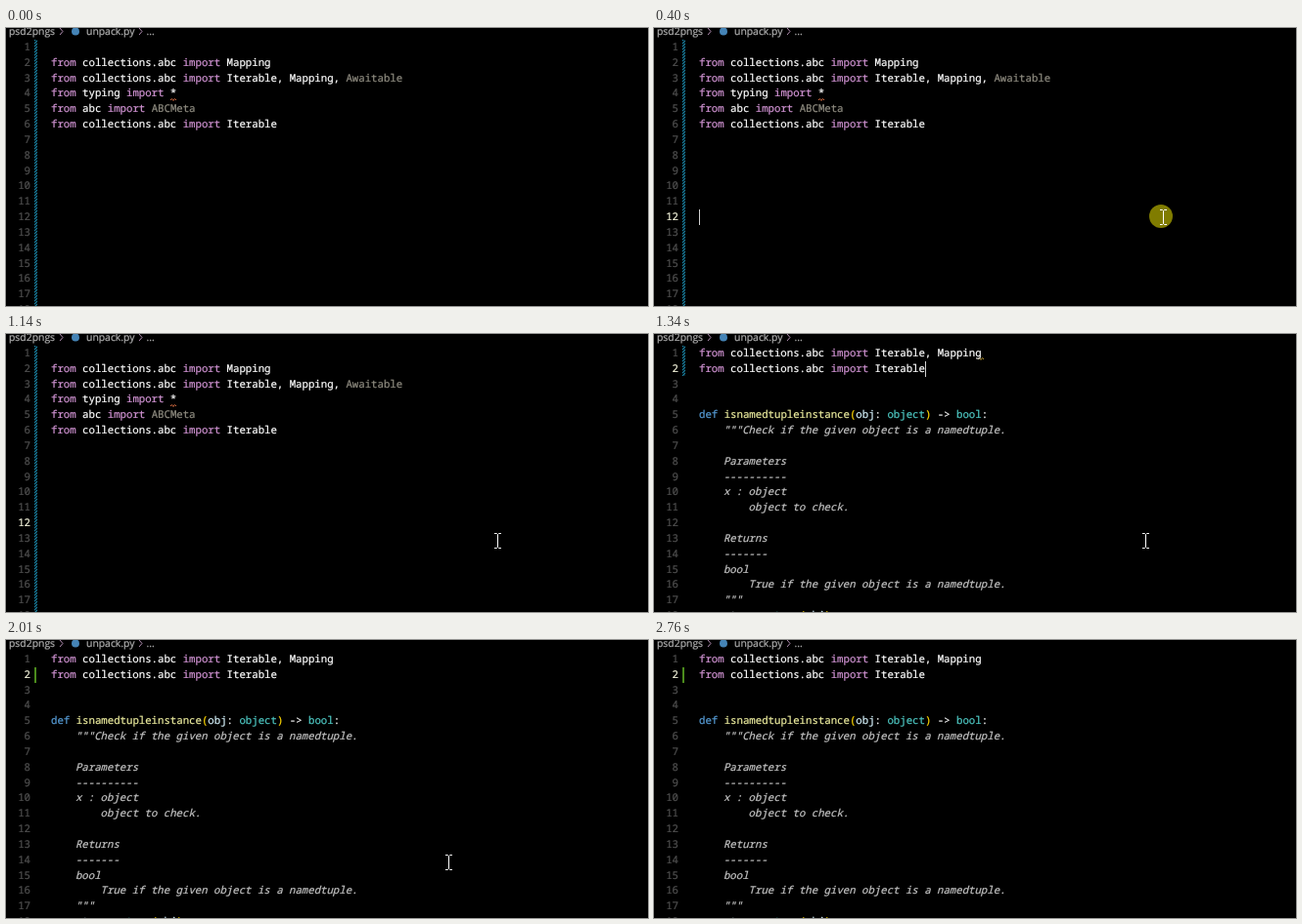
An HTML page that plays this animation: 656 by 285 pixels, repeating every 2.89 s.

```html
<!DOCTYPE html>
<html lang="en">
<head>
<meta charset="utf-8">
<title>Organizing imports</title>
<style>
  html, body { margin: 0; height: 100%; background: #000; overflow: hidden; }
  svg { display: block; width: 656px; height: 285px; }
  text {
    font: 10.69px "Noto Sans Mono", "DejaVu Sans Mono", monospace;
    color: #fff; white-space: pre; text-rendering: geometricPrecision;
  }
  text, tspan { fill: currentColor; stroke: currentColor; stroke-width: .22; }
  .crumb text { font: 10.4px "Open Sans", "Noto Sans", sans-serif; color: #b0b0b0; }
  .num { color: #505050; text-anchor: end; }
  .num.on { color: #f4f4dc; }
  .k { color: #d294d4; }
  .u { color: #8f8c80; }
  .d { color: #569cd6; }
  .f { color: #ecec9e; }
  .v { color: #d4f0fa; }
  .p { color: #ffd700; }
  .t { color: #4ec9c4; }
  .s { color: #c4c4c4; font-style: italic; }
  text:has(.s) { transform: translateX(-.7px); }
  .line { fill: none; stroke-width: 1; }
</style>
</head>
<body>
<svg viewBox="0 0 656 285">
  <defs>
    <pattern id="hatch" width="3" height="3" patternUnits="userSpaceOnUse">
      <path d="M-1 1L1 -1M0 3L3 0M2 4L4 2" stroke="#1b8fb4" stroke-width="1.1"/>
    </pattern>
  </defs>
  <rect width="656" height="285"/>
  <g class="crumb">
    <text x="3" y="7">psd2pngs</text>
    <text x="82" y="7">unpack.py</text>
    <text x="143.5" y="7">...</text>
    <path class="line" d="M55 0l3 3.5l-3 3.5M136 0l3 3.5l-3 3.5" stroke="#b08cb0"/>
    <circle cx="71" cy="3.5" r="4" fill="#4584b6"/>
  </g>
  <g id="nums"></g>
  <g id="before">
    <rect x="29" y="12" width="3" height="273" fill="url(#hatch)"/>
    <path class="line" d="M168 74l1.5 -1.5l1.5 2l1.5 -2l1.5 1.5" stroke="#d0693f"/>
  </g>
  <g id="after">
    <rect id="pending" x="29" y="12" width="3" height="31" fill="url(#hatch)"/>
    <rect id="added" x="29" y="28" width="2" height="16" fill="#4b8b1c"/>
    <path id="wave" class="line" d="M331 26l1.5 -1.5l1.5 2l1.5 -2l1.5 1.5" stroke="#b09030"/>
  </g>
  <rect id="caret" width="1" height="16" fill="#d0d0d0"/>
  <circle id="click" cx="518" cy="193" r="12" fill="#807c00"/>
  <path id="mouse" class="line" stroke="#fff"
    d="M-3.5 -7.5H-1L0 -6.5L1 -7.5H3.5M0 -6.5V6.5M-3.5 7.5H-1L0 6.5L1 7.5H3.5"/>
</svg>
<script>
const $ = id => document.getElementById(id);
const show = (id, on) => $(id).setAttribute("visibility", on ? "visible" : "hidden");
const baseline = n => Math.round(23 + 15.83 * (n - 1));

// "{c text}" gives the text class c
const paint = src => src.replace(/\{(\w) ([^}]*)\}/g, '<tspan class="$1">$2</tspan>');

function addCode(group, rows) {
  rows.forEach((src, i) => {
    if (src) $(group).innerHTML += `<text x="46" y="${baseline(i + 1)}">${paint(src)}</text>`;
  });
}

const imports = (module, names) => `{k from} ${module} {k import} ${names}`;
const doc = s => `{s ${s}}`;

addCode("before", [
  "",
  imports("collections.abc", "Mapping"),
  imports("collections.abc", "Iterable, Mapping, {u Awaitable}"),
  imports("typing", "*"),
  imports("abc", "{u ABCMeta}"),
  imports("collections.abc", "Iterable")
]);

addCode("after", [
  imports("collections.abc", "Iterable, Mapping"),
  imports("collections.abc", "Iterable"),
  "", "",
  "{d def} {f isnamedtupleinstance}{p (}{v obj}: {t object}{p )} -&gt; {t bool}:",
  doc('    """Check if the given object is a namedtuple.'),
  "",
  doc("    Parameters"),
  doc("    ----------"),
  doc("    x : object"),
  doc("        object to check."),
  "",
  doc("    Returns"),
  doc("    -------"),
  doc("    bool"),
  doc("        True if the given object is a namedtuple."),
  doc('    """'),
  "    {v _type} = {t type}{p (}{v obj}{p )}"
]);

for (let n = 1; n <= 18; n++)
  $("nums").innerHTML += `<text class="num" x="25" y="${baseline(n)}">${n}</text>`;
const nums = [...$("nums").children];

// Pointer path: step, x, y
const path = [
  [1, 586, 276], [5, 520.5, 194], [10, 520.5, 194], [11, 516.5, 196],
  [17, 502.5, 212], [27, 502.5, 212], [30, 452.5, 228], [34, 315.5, 272]
];

function pointer(k) {
  const i = Math.max(1, path.findIndex(p => p[0] >= k));
  const [a, ax, ay] = path[i - 1], [b, bx, by] = path[i];
  const f = (k - a) / (b - a);
  return [ax + (bx - ax) * f, ay + (by - ay) * f];
}

const LOOP = 2890, STEP = 66.7;
const within = (k, a, b) => k >= a && k < b;

function draw() {
  const k = Math.floor((performance.now() % LOOP + 4) / STEP);
  const sorted = k >= 20;

  $("before").style.display = sorted ? "none" : "";
  $("after").style.display = sorted ? "" : "none";
  show("pending", k < 25);
  show("added", k >= 25);
  show("wave", k < 22);

  const active = sorted ? 2 : k >= 6 ? 12 : 0;
  nums.forEach((el, i) => el.classList.toggle("on", i + 1 === active));

  $("caret").setAttribute("x", sorted ? 277 : 46);
  $("caret").setAttribute("y", sorted ? 28 : 186);
  show("caret", within(k, 6, 13) || within(k, 20, 28) || within(k, 34, 41));

  show("click", k === 6);
  const moving = within(k, 1, 35);
  show("mouse", moving);
  if (moving) $("mouse").setAttribute("transform", `translate(${pointer(k)})`);
  requestAnimationFrame(draw);
}
draw();
</script>
</body>
</html>
```
